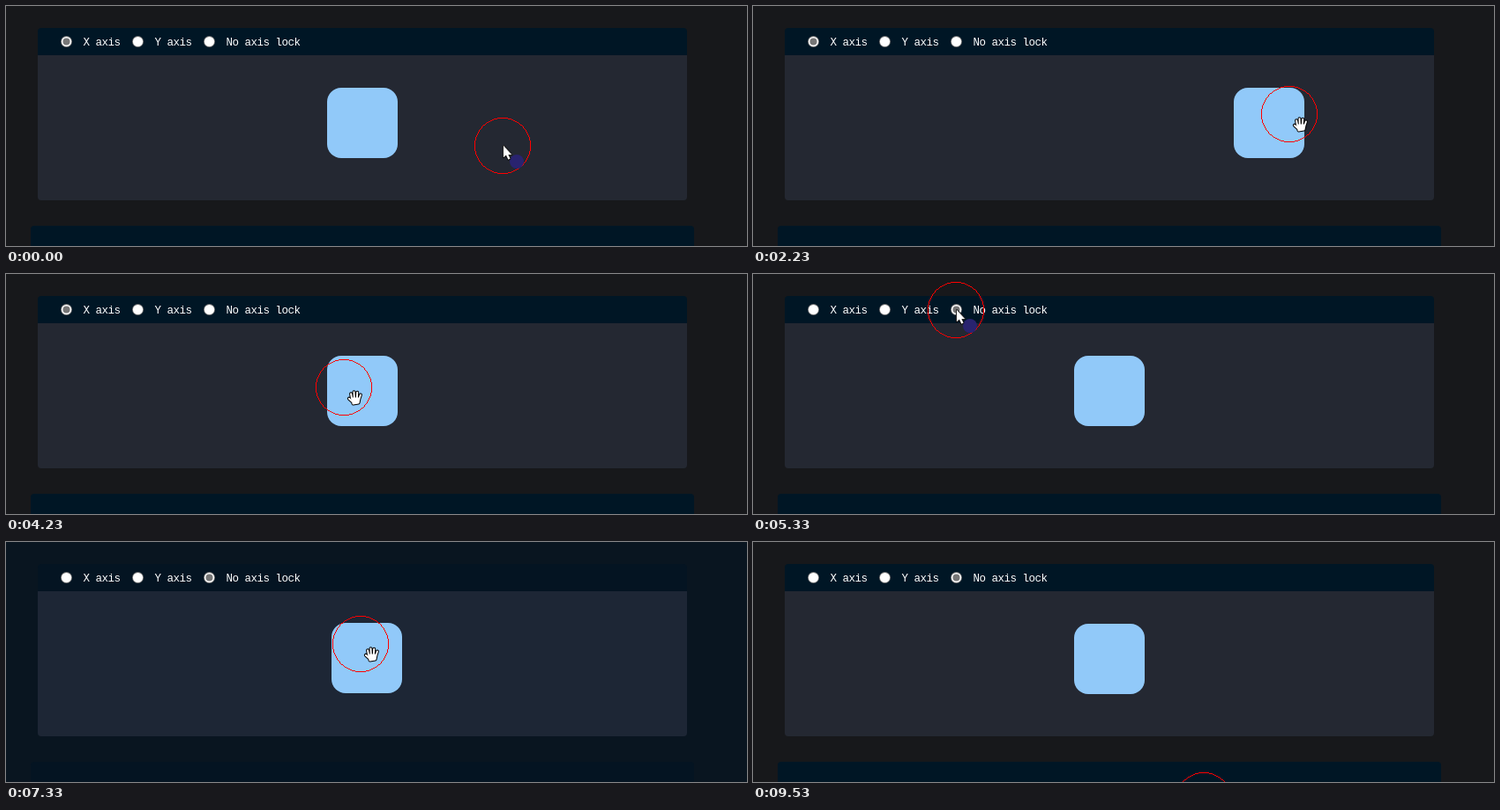
These frames come from a looping animation (840x273 px, 9.63 s). An HTML page with a canvas:

```html
<!DOCTYPE html>
<html lang="en">
<head>
<meta charset="utf-8">
<title>Axis-locked drag</title>
<style>
  html, body { margin: 0; width: 100%; height: 100%; overflow: hidden; background: #17181b; }
  canvas { display: block; }
</style>
</head>
<body>
<canvas id="stage" width="840" height="273"></canvas>
<script>
const ctx = document.getElementById('stage').getContext('2d');
const LOOP = 9630;
const SELECT_TIME = 5130;
const HOME = { x: 364, y: 93 };
const SIZE = 80;
const RETURN_TIME = 182;

const drags = [
  { start: 730, end: 2430, lockX: true },
  { start: 6530, end: 7430 },
  { start: 7630, end: 8130 }
];

const page = [[23, 24, 27], [5, 20, 33]];
const panel = [[36, 40, 50], [27, 38, 54]];
const header = [[0, 22, 37], [5, 20, 33]];

const mix = (a, b, k) => a + (b - a) * k;
const blend = ([from, to], k) => `rgb(${from.map((v, i) => Math.round(mix(v, to[i], k)))})`;

// Smooth progress from 0 to 1 between two times.
function ease(t, start, end) {
  const k = Math.min(1, Math.max(0, (t - start) / (end - start)));
  return k * k * (3 - 2 * k);
}

function pointerAt(t) {
  let x = 563, y = 159;
  const glide = (start, end, toX, toY) => {
    const k = ease(t, start, end);
    x = mix(x, toX, k);
    y = mix(y, toY, k);
  };
  // Reach the box, pull it right, let go and come back.
  glide(0, 430, 384, 115);
  glide(430, 630, 427, 115);
  glide(1030, 2630, 642, 125);
  glide(2630, 3030, 362, 125);
  glide(3030, 3830, 407, 133);
  glide(4130, 4230, 383, 129);
  // Choose the third option and grab the box again.
  glide(4230, 5130, 230, 41);
  glide(5430, 6230, 397, 117);
  // One loop upwards, then a second pull and away.
  const turn = 2 * Math.PI * ease(t, 6530, 7430);
  x -= 24 * Math.sin(turn);
  y -= 42 * (1 - Math.cos(turn));
  glide(7430, 7630, 380, 132);
  glide(7630, 8130, 488, 87);
  glide(8130, 8630, 511, 294);
  return { x, y };
}

// The box follows the pointer while held and decays back home afterwards.
function boxAt(t) {
  const drag = drags.findLast(d => t >= d.start);
  if (!drag) return HOME;
  const grab = pointerAt(drag.start);
  const held = pointerAt(Math.min(t, drag.end));
  const pull = Math.exp(-Math.max(0, t - drag.end) / RETURN_TIME);
  return {
    x: HOME.x + (held.x - grab.x) * pull,
    y: HOME.y + (drag.lockX ? 0 : (held.y - grab.y) * pull)
  };
}

const rounded = p => ({ x: Math.round(p.x), y: Math.round(p.y) });

function roundRect(x, y, w, h, radii, fill) {
  ctx.fillStyle = fill;
  ctx.beginPath();
  ctx.roundRect(x, y, w, h, radii);
  ctx.fill();
}

function disc(x, y, r, fill) {
  ctx.fillStyle = fill;
  ctx.beginPath();
  ctx.arc(x, y, r, 0, Math.PI * 2);
  ctx.fill();
}

function radio(x, label, checked) {
  disc(x, 40.5, 6.5, '#767676');
  disc(x, 40.5, 5.6, '#fff');
  if (checked) disc(x, 40.5, 4, '#767676');
  ctx.fillStyle = '#fff';
  ctx.font = '12.5px "Liberation Mono", monospace';
  ctx.letterSpacing = '-0.5px';
  ctx.fillText(label, x + 19, 45);
}

// Hard-edged ring, one pixel wide.
function pixelRing(x, y, r, color) {
  ctx.fillStyle = color;
  for (let d = -22.5; d <= 22.5; d++) {
    const e = Math.floor(Math.sqrt(r * r - d * d)) + 0.5;
    for (const side of [-e, e]) {
      ctx.fillRect(x + d - 0.5, y + side - 0.5, 1, 1);
      ctx.fillRect(x + side - 0.5, y + d - 0.5, 1, 1);
    }
  }
}

const arrow = new Path2D('M1 0 V13 L4 10.5 L6.4 15.5 L8.4 14.6 L6.2 10 H10 Z');
const hand = new Path2D(
  'M5.5 10 L4.6 4.8 M8.3 10 L8 2.8 M11.3 10 L11.7 3.2 M13.8 11 L15.4 6 ' +
  'M6 13.5 L2.4 10.2 M6 10 H14 L13 15 L7 16 Z');

function outlined(shape, outer, inner) {
  for (const [width, color] of [[outer, '#000'], [inner, '#fff']]) {
    ctx.lineWidth = width;
    ctx.strokeStyle = color;
    ctx.stroke(shape);
  }
  ctx.fillStyle = '#fff';
  ctx.fill(shape);
}

function drawPointer(x, y, overBox) {
  pixelRing(x, y, 31.5, '#f00');
  ctx.save();
  ctx.lineJoin = ctx.lineCap = 'round';
  if (overBox) {
    ctx.translate(x + 3.5, y + 2.5);
    outlined(hand, 4, 2);
  } else {
    disc(x + 16, y + 18, 8, '#29236f');
    ctx.translate(x, y);
    outlined(arrow, 2, 0.3);
  }
  ctx.restore();
}

function draw(t) {
  const tint = ease(t, 6030, 7930) * (1 - ease(t, 8130, 8630));
  const pointer = rounded(pointerAt(t));
  const box = rounded(boxAt(t));
  const selected = t < SELECT_TIME ? 0 : 2;

  ctx.fillStyle = blend(page, tint);
  ctx.fillRect(0, 0, 840, 273);
  roundRect(36, 25, 736, 31, [4, 4, 0, 0], blend(header, tint));
  roundRect(36, 56, 736, 165, [0, 0, 4, 4], blend(panel, tint));
  roundRect(28, 250, 752, 40, 4, blend(header, tint));

  ['X axis', 'Y axis', 'No axis lock'].forEach(
    (label, i) => radio(68.5 + i * 81, label, i === selected));

  roundRect(box.x, box.y, SIZE, SIZE, 16, '#91c9f9');
  const inside = (p, start) => p >= start && p < start + SIZE;
  drawPointer(pointer.x, pointer.y, inside(pointer.x, box.x) && inside(pointer.y, box.y));
}

// The picture advances ten times a second, with one longer step near the start.
const snap = t => t < 630
  ? Math.min(5, Math.floor(t / 100)) * 100
  : Math.floor((t - 30) / 100) * 100 + 30;

const start = performance.now();
function tick() {
  draw(snap((performance.now() - start) % LOOP));
  requestAnimationFrame(tick);
}
tick();
</script>
</body>
</html>
```
